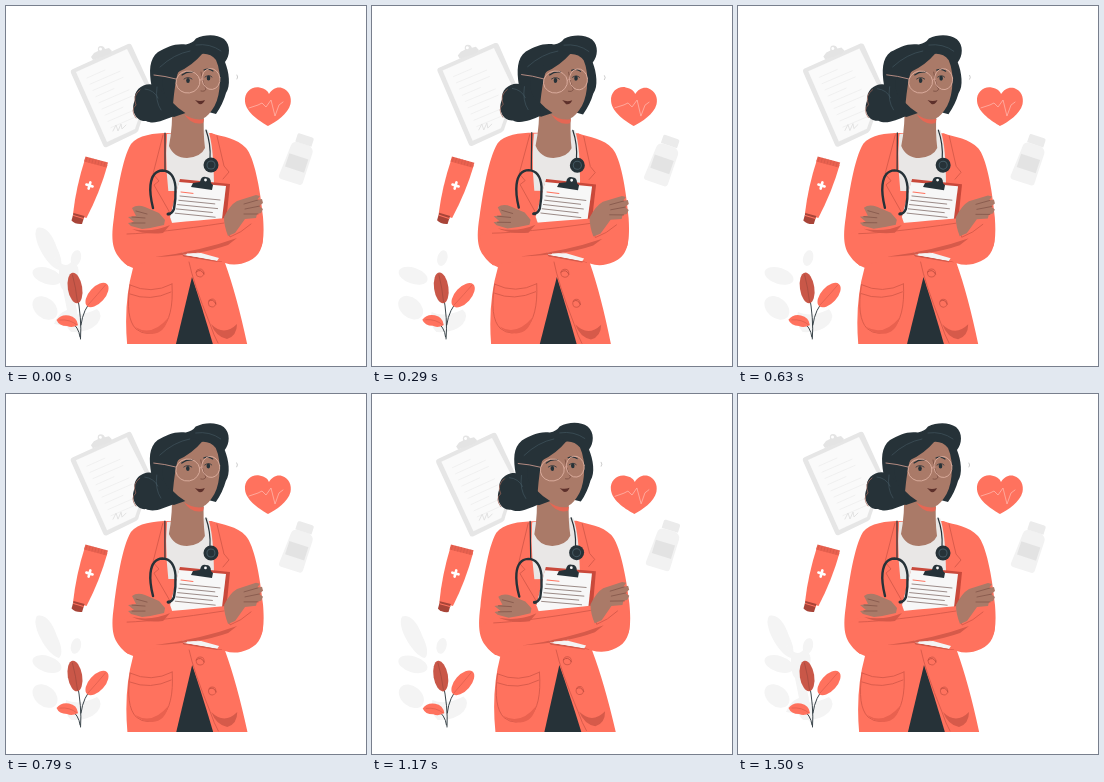
Recreate the animation shown at these times as an HTML page with a canvas. Size 360 px wide and 360 px high, loop 1540 ms.

```html
<!DOCTYPE html>
<html lang="en">
<head>
<meta charset="utf-8">
<title>Doctor</title>
<style>
html, body { margin: 0; width: 100%; height: 100%; overflow: hidden; background: #fff; }
canvas { display: block; width: 100vw; height: 100vh; }
</style>
</head>
<body>
<canvas></canvas>
<script>
const canvas = document.querySelector('canvas');
const ctx = canvas.getContext('2d');
const SIZE = 360, FLOOR = 338, LOOP = 1540, SWAY = 1500, FPS = 24;
const ORANGE = '#ff725e', SHADE = '#d65a4a', DARK = '#263238', SKIN = '#aa7a68', SKIN_DARK = '#7d5145';

function paint(path, fill, stroke, width = 1) {
  const p = path instanceof Path2D ? path : new Path2D(path);
  if (fill) { ctx.fillStyle = fill; ctx.fill(p); }
  if (stroke) { ctx.strokeStyle = stroke; ctx.lineWidth = width; ctx.stroke(p); }
}
const line = (path, color, width) => paint(path, null, color, width);

function oval(x, y, rx, ry, turn, fill, stroke, width) {
  const p = new Path2D();
  p.ellipse(x, y, rx, ry, turn * Math.PI / 180, 0, Math.PI * 2);
  paint(p, fill, stroke, width);
}

function at(x, y, turn, draw) {
  ctx.save();
  ctx.translate(x, y);
  ctx.rotate(turn * Math.PI / 180);
  draw();
  ctx.restore();
}

// Draws parts in stage coordinates, turned around their own pivot
function sway(x, y, turn, ...parts) {
  at(x, y, turn, () => {
    ctx.translate(-x, -y);
    parts.forEach(part => part());
  });
}

function backBoard() {
  paint('M67 63 L122 38 Q125 37 126 40 L146 84 L133 122 Q133 125 130 127 L101 141 Q98 142 97 139 L65 67 Q64 64 67 63Z', '#e6e6e6');
  paint('M70 66 L121 43 L142 85 L129 123 L101 136Z', '#fafafa');
  paint('M85 51 L88 47 L92 45 Q91 40 95 40 Q98 40 99 43 L103 42 L106 45 L104 48 L87 54Z', '#e4e4e4');
  oval(94.5, 43, 1.5, 1.5, 0, '#fff');
  for (let i = 0; i < 9; i++) {
    const x = 81 + i * 3, y = 72 + i * 6.2;
    line(`M${x} ${y} l${i % 3 ? 30 : 18} ${i % 3 ? -13 : -8}`, '#eeeeee', 0.8);
  }
  line('M107 125 l3 -6 l2 6 l3 -7 l1 5 l4 -4', '#e0e0e0', 0.9);
}

function bottle() {
  at(291, 156, 18, () => {
    paint('M-11 -13 Q-11 -18 -6 -19 L7 -19 Q12 -17 12 -13 L12 18 Q12 21 9 21 L-10 21 Q-13 21 -13 18Z', '#f2f2f2');
    paint('M-8 -26 Q-8 -28 -6 -28 L7 -28 Q9 -28 9 -26 L9 -19 L-8 -19Z', '#ebebeb');
    ctx.fillStyle = '#e3e3e3';
    ctx.fillRect(-10, -6, 20, 14);
  });
}

function tube() {
  paint('M79 153 L101.5 159 Q94 186 80.5 212 L67 208 Q70 181 79 153Z', ORANGE);
  paint('M79.5 150.5 L102 156.5 L100.5 161.5 L78 155.5Z', '#e9614f');
  for (let i = 0; i < 7; i++) line(`M${81 + i * 3} ${151.5 + i * .8} l-1 4`, SHADE, .7);
  paint('M67.5 207 L78.5 210 L76 218 Q69 218.5 65.5 214.5Z', '#a84438');
  line('M67.5 209.5 L77.5 212.5', ORANGE, 1);
  at(83.5, 179.5, 16, () => line('M-3.2 0 H3.2 M0 -3.2 V3.2', '#fff', 2.6));
}

function heart() {
  paint('M262 120 C255 116 240 107 239 95.5 C238 86 246 80 253.5 81.5 C259 82.5 262 85 263 88 C266 83 271 80.5 276 82 C283 84.5 286 91 284.5 98 C282 108 270 116 262 120Z', ORANGE);
  line('M243 102 L252 99 L256 97 L260 101 L265 94 L269 110 L273 99 L277 96', '#ffb5aa', .8);
}

function palePlant(frame) {
  const pale = '#f4f4f4';
  const full = frame < 2 || frame > 34;
  const topLeaf = full || frame > 15;
  oval(41, 270, 15, 8, 18, pale);
  oval(39, 302, 14, 10, 40, pale);
  oval(70, 252, 5, 8, 15, pale);
  paint('M60 306 Q73 312 91 303 Q98 309 91 318 Q82 327 65 326 Q57 318 60 306Z', pale);
  if (topLeaf) paint('M31 222 C40 219 47 230 51 242 C56 252 57 261 53 264 C43 261 34 245 31 236 Q28 226 31 222Z', pale);
  if (full) {
    paint('M48 250 Q59 265 66 255 Q76 261 71 272 L65 283 Q72 300 74 330 Q67 320 48 318 Q52 307 61 304 L57 284 Q52 279 53 263Z', pale);
  }
}

function redPlant() {
  line('M74.5 333 Q76 313 71 288 M75 319 Q77 303 87 293 M74 331 Q73 321 64 315', DARK, .9);
  oval(69, 282, 7.2, 15.5, -9, '#c95748');
  line('M66.5 269 Q70 282 71.5 296', '#99463b', .6);
  oval(91, 289, 8, 14.8, 42, ORANGE);
  line('M99.5 279 Q92 288 82 299', SHADE, .6);
  paint('M50.5 314 Q55 308 63 309.5 Q71 311 72 319 Q66 322.5 61 320 Q53 320 50.5 314Z', ORANGE);
  line('M54 314 Q64 313 71 319', SHADE, .6);
}

function coat() {
  paint('M163 127 C148 127 132 129 125 138 C116 153 111 188 108 211 C105 231 106 242 112 250 Q118 259 127 262 Q117 298 121.5 342 L242 342 Q231 290 219 257 Q230 261 243 255 C256 249 259 237 257 211 C254 181 248 151 240 142 C231 132 217 131 205 127Z', ORANGE);
  paint('M186 271 L169 342 L208 342 Q197 304 186 271Z', DARK);
  line('M183 256 Q187 276 204 318 Q208 330 212 337', SHADE, .9);
  paint('M205 318 Q218 331 231 318 Q231 330 221 333 Q210 331 205 318Z', SHADE);
  line('M124 279 Q145 289 166 278 M124 288 Q144 296 165 286 M124 279 Q119 312 130 323 Q141 332 155 323 Q168 312 166 278', SHADE, .9);
  paint('M129 321 Q146 331 162 312 Q159 327 146 328 Q136 328 129 321Z', '#e9614f');
  oval(194, 267, 4, 4, 0, ORANGE, SHADE, 1);
  oval(206, 297, 3.7, 4, 0, ORANGE, SHADE, 1);
  line('M190 266 Q195 262 198 268 M203 295 Q207 292 210 298', '#b94a3c', .8);
}

function chest() {
  paint('M161 128 L202 124 Q208 139 208 185 L160 185 Q158 153 161 128Z', '#e9e7e6');
  paint('M166 94 Q167 120 163 140 Q168 152 181 152 Q195 151 199 142 Q197 127 198 108Z', SKIN);
  paint('M178 108 Q187 115 198 113 L197 117 Q186 120 178 108Z', '#e56754');
  paint('M161 127 L157 129 L147 168 L153 175 L148 179 L166 212 Q158 165 161 127Z', ORANGE);
  paint('M205 127 L211 130 L218 160 L223 166 L217 173 L211 187 Q212 155 205 127Z', ORANGE);
  line('M157 129 L147 168 L153 175 L148 179 L164 207 M211 130 L218 160 L223 166 L217 173', SHADE, .9);
  line('M159 127 V165 M200 124 Q205 138 204 153', DARK, 1.2);
}

function frontBoard() {
  paint('M174 173 L224 178 L216 256 L177 250 L164 210Z', '#c9493b');
  paint('M173 176 L220 180 L211 254 L177 249 L164 211Z', '#f7f7f7');
  paint('M185 181 L187 177 L194 176 Q195 170 200 171 Q205 171 205 177 L207 179 L206 184Z', DARK);
  oval(199.5, 174, 1.4, 1.4, 0, '#fafafa');
  line('M175 186 l12 1.4', ORANGE, 1);
  for (let i = 0; i < 5; i++) {
    const x = 174 - i * 1.2, y = 190 + i * 4.3;
    line(`M${x} ${y} l${i % 2 ? 36 : 40} ${i % 2 ? 3.6 : 4}`, '#84706c', .8);
  }
}

function stethoscope() {
  line('M147 202 Q143.5 188 144.5 179 Q146 165 156.5 164.5 Q168 165 169.5 181 Q170 193 168 203 Q166 208 162 208', DARK, 2.4);
  oval(162.5, 208, 2, 1.6, 0, DARK);
  oval(205, 159, 7.5, 7.5, 0, DARK);
  oval(205, 159, 4.5, 4.5, 0, '#455a64');
  oval(205, 159, 3.5, 3.5, 0, DARK);
}

function arms() {
  paint('M126 221 Q162 217 220 212 L224 231 L232 235 Q210 244 174 247 Q139 258 122 260 Q107 248 109 230Z', ORANGE);
  paint('M218 213 L231 226 Q247 217 255 211 Q258 232 256 239 Q250 253 229 258 L212 255 Q199 251 187 248 L223 237Z', ORANGE);
  paint('M149 251 Q195 245 231 232 L222 239 Q194 249 149 251Z', SHADE);
  paint('M126 223 Q146 227 164 219 L157 227 Q139 229 126 223Z', SHADE);
  line('M121 228 Q153 227 218 217 M219 214 L224 231 Q235 227 245 218', SHADE, .9);
  paint('M181 247.5 L195 247 L213 252 L211 255 L180 249Z', '#f4f4f4');
  line('M178 250 L211 255.5', SHADE, 1.2);

  paint('M126 202 Q131 198 139 201 L153 207 L159 214 L158 219 Q146 222 136 223 L125 220 L122 217 L128 216 L122 211 L130 210Z', SKIN);
  line('M126 211 L139 212 M126 217 L139 217 M130 205 L141 208', SKIN_DARK, .7);
  paint('M218 211 Q224 199 231 195 L250 189 L254 190 L251 194 L256 193 L257 197 L253 200 L257 203 L255 207 L251 208 L250 212 L239 213 L229 227 L222 230 Q218 220 218 211Z', SKIN);
  line('M252 194 L238 198 M254 200 L239 203 M252 208 L238 208', SKIN_DARK, .7);
}

function head() {
  // back of the hair and the bun
  paint('M145.5 80 C143 65 143 53 152 46 C161 41 169 37 180 38.5 Q187 37 190 32.5 C199 28 211 28 218 33 C225 39 224 50 219 56 C223 66 225 80 220 87 Q217 98 210 108 L191 103 L168 111 Q156 108 145.5 80Z', DARK);
  paint('M148 79 C138 76 127 84 129 94 C124 104 130 116 140 115 C148 119 158 114 168 110 L166 94Z', DARK);
  line('M134 84 Q126 90 130 99 Q124 104 130 112', '#a66a5d', .7);
  line('M151 81 Q149 95 155 104 M139 83 Q148 84 152 92', '#455a64', .6);

  paint('M166 96 L167 75 Q173 62 190 49 Q203 45 210 54 Q215 65 213.5 82 Q212 96 206 104 Q200 113 194 113 Q178 109 166 96Z', SKIN);
  paint('M166 98 Q155 88 157 72 L186 44 L197 47 Q186 60 172 66 Q169 76 167 98Z', DARK);
  line('M190 39 Q204 37 215 45 M154 61 Q168 48 184 45', '#455a64', .6);

  line('M176 69 Q181 65 187 66 M198 64 Q203 62 207 65', DARK, 1.2);
  oval(182, 74.5, 1.8, 2.5, 0, DARK);
  oval(202.5, 72, 1.8, 2.5, 0, DARK);
  line('M178 73 Q182 70 186 73 M199 71 Q203 68 206 71', DARK, .8);
  line('M195 66 Q197 78 200 83 Q199 86 195 85', SKIN_DARK, .9);
  paint('M189 94 Q194 96 199 94 Q197 99 193 98Z', '#5d302b');

  oval(182, 76, 12, 11, -8, null, '#deb0a1', .9);
  oval(205, 73, 9, 10.5, -8, null, '#deb0a1', .9);
  line('M194 74 Q195 72 197 73 M170 73 Q159 70 148 69', '#d6a194', .8);
  line('M231 69 Q232.5 71 231 73', '#aaa', .6);
}

function drawScene(ms) {
  const frame = Math.floor((ms + 5) * FPS / 1000);
  const phase = Math.min(frame / FPS * 1000 / SWAY, 1);
  // Linear sway: 0, +1, -1, 0 degrees at 0, 25, 75 and 100 %
  const degrees = phase < .25 ? phase * 4 : phase < .75 ? 2 - phase * 4 : phase * 4 - 4;
  const w = canvas.width, h = canvas.height, scale = Math.min(w, h) / SIZE;
  ctx.setTransform(1, 0, 0, 1, 0, 0);
  ctx.fillStyle = '#fff';
  ctx.fillRect(0, 0, w, h);
  ctx.setTransform(scale, 0, 0, scale, (w - SIZE * scale) / 2, (h - SIZE * scale) / 2);
  ctx.lineCap = ctx.lineJoin = 'round';
  ctx.save();
  ctx.beginPath();
  ctx.rect(0, 0, SIZE, FLOOR);
  ctx.clip();
  sway(187, 108, degrees, backBoard, bottle);
  sway(60, 278, degrees, () => palePlant(frame));
  sway(84, 184, degrees, tube);
  sway(262, 101, degrees, heart);
  sway(76, 300, degrees, redPlant);
  sway(181, 184, degrees, coat, chest, frontBoard, stethoscope, arms, head);
  ctx.restore();
}

function resize() {
  const ratio = window.devicePixelRatio || 1;
  canvas.width = Math.round(innerWidth * ratio);
  canvas.height = Math.round(innerHeight * ratio);
}

function tick() {
  drawScene(performance.now() % LOOP);
  requestAnimationFrame(tick);
}

addEventListener('resize', resize);
resize();
tick();
</script>
</body>
</html>
```
